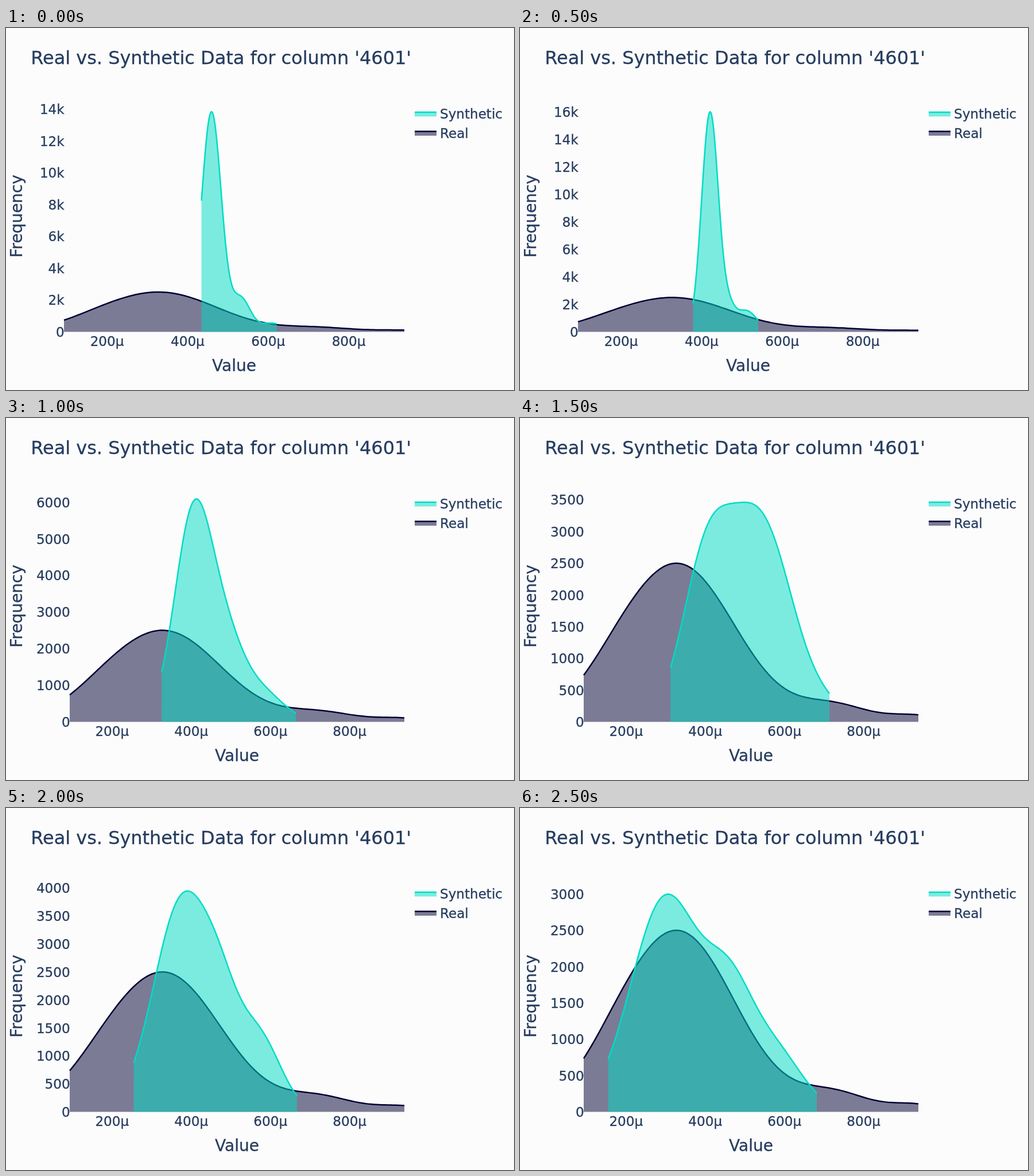
Recreate the animation shown at these times as an HTML page. Size 885 by 632 pixels, loop 3 s.

```html
<!DOCTYPE html>
<html lang="en">
<head>
<meta charset="utf-8">
<title>Real vs. Synthetic Data</title>
<style>
  html, body { margin: 0; width: 100%; height: 100%; overflow: hidden; background: #fcfcfc; }
  svg { display: block; width: 885px; height: 632px; }
  text {
    font: 23.1px "DejaVu Sans", Verdana, sans-serif;
    fill: #263c5f; stroke: #263c5f; stroke-width: .3px;
  }
  .title { font-size: 31.95px; }
  .axis { font-size: 28px; text-anchor: middle; }
  .xtick { text-anchor: middle; }
  .ytick { text-anchor: end; }
  .real { --ink: #000033; }
  .synth { --ink: #00dcc5; }
  .line { fill: none; stroke: var(--ink); stroke-width: 2.5; stroke-linejoin: round; }
  .area { fill: var(--ink); fill-opacity: .51; }
  .epoch { visibility: hidden; animation: show 3s step-end infinite; }
  @keyframes show {
    0% { visibility: visible; }
    16.666%, 100% { visibility: hidden; }
  }
</style>
</head>
<body>
<svg id="chart" viewBox="0 0 885 632">
  <text class="title" x="43.3" y="63">Real vs. Synthetic Data for column '4601'</text>
  <text class="axis" transform="translate(28 328.5) rotate(-90)">Frequency</text>
</svg>
<script>
const RIGHT = 694, BASE = 530.5, X_MIN = 93, X_MAX = 938.2;
const chart = document.getElementById("chart");

// A density is a sum of bells [centre in µ, height, spread] over a range of values.
const real = {
  from: X_MIN, to: X_MAX,
  bells: [[330, 2490, 145], [165, 130, 75], [725, 255, 86], [930, 100, 65]],
};

// left: plot edge, step: tick spacing, gap: its height in px, top: last tick
const epochs = [
  { left: 101, step: 2000, gap: 55.55, top: 14000, from: 434.4, to: 621,
    bells: [[459.3, 13824, 24.5], [532, 2052, 23.1], [610, 540, 34.2]] },
  { left: 101, step: 2000, gap: 47.98, top: 16000, from: 378.8, to: 540.5,
    bells: [[421.1, 16000, 20.9], [468, 1210, 15.7], [510.6, 1540, 27.1]] },
  { left: 111, step: 1000, gap: 63.9, top: 6000, from: 325, to: 664.2,
    bells: [[406, 5665, 47.8], [489, 1830, 46.4], [578.6, 782, 55.1]] },
  { left: 111, step: 500, gap: 55.36, top: 3500, from: 312, to: 713.5,
    bells: [[400.3, 2213, 60.9], [536.6, 3180, 82.6], [715, 126, 43.5]] },
  { left: 111, step: 500, gap: 48.83, top: 4000, from: 254.6, to: 667,
    bells: [[378.6, 3789, 72.5], [475.7, 1106, 46.4], [571.4, 1290, 55.1]] },
  { left: 111, step: 500, gap: 63.35, top: 3000, from: 154.6, to: 681.6,
    bells: [[300.3, 2952, 87], [461.2, 1381, 60.9], [577.2, 789, 69.6]] },
];

function add(parent, tag, attrs, text = "") {
  const el = document.createElementNS("http://www.w3.org/2000/svg", tag);
  for (const key in attrs) el.setAttribute(key, attrs[key]);
  el.textContent = text;
  return parent.appendChild(el);
}

function density(parent, name, { from, to, bells }, sx, sy) {
  const n = 120, pts = [];
  for (let i = 0; i <= n; i++) {
    const v = from + (to - from) * i / n;
    const f = bells.reduce((sum, [m, h, s]) => sum + h * Math.exp(-((v - m) ** 2) / (2 * s * s)), 0);
    pts.push(`${sx(v).toFixed(2)} ${sy(f).toFixed(2)}`);
  }
  const d = "M" + pts.join("L");
  const g = add(parent, "g", { class: name });
  add(g, "path", { class: "area", d: `${d}V${BASE}H${sx(from)}Z` });
  add(g, "path", { class: "line", d });
}

function legend(name, label, y) {
  const g = add(chart, "g", { class: name });
  add(g, "path", { class: "area", d: `M712 ${y}h38v7.5h-38z` });
  add(g, "path", { class: "line", d: `M712 ${y}h38` });
  add(g, "text", { x: 756, y: y + 11.1 }, label);
}

legend("synth", "Synthetic", 146.9);
legend("real", "Real", 180.4);

epochs.forEach((epoch, i) => {
  const { left, step, gap, top } = epoch;
  const g = add(chart, "g", { class: "epoch", style: `animation-delay:${i * 0.5 - 3}s` });
  const sx = v => left + (v - X_MIN) / (X_MAX - X_MIN) * (RIGHT - left);
  const sy = f => BASE - f / step * gap;

  density(g, "real", real, sx, sy);
  density(g, "synth", epoch, sx, sy);

  for (let f = 0; f <= top; f += step) {
    const label = f && top >= 10000 ? f / 1000 + "k" : f;
    add(g, "text", { class: "ytick", x: left + 0.7, y: sy(f) + 8.5 }, label);
  }
  for (let v = 200; v <= 800; v += 200) {
    add(g, "text", { class: "xtick", x: sx(v), y: 555.3 }, v + "µ");
  }
  add(g, "text", { class: "axis", x: (left + RIGHT) / 2, y: 598.5 }, "Value");
});
</script>
</body>
</html>
```
